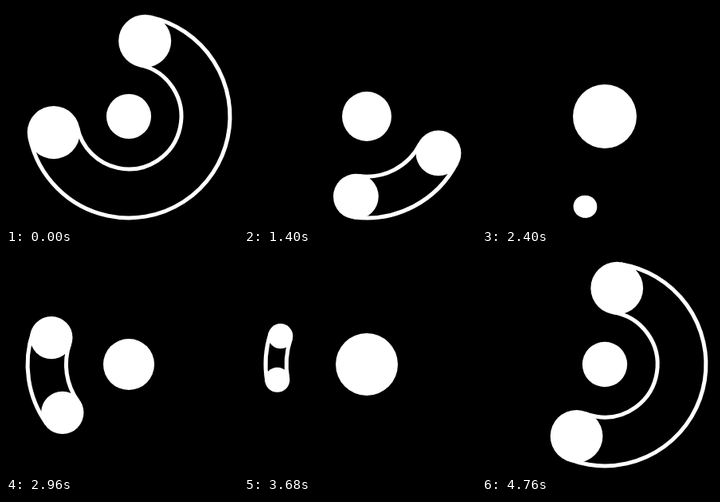
Recreate the animation shown at these times as an HTML page with a canvas. Size 291 by 275 pixels, loop 4.8 s.

```html
<!DOCTYPE html>
<html lang="en">
<head>
<meta charset="utf-8">
<title>Orbiting arc</title>
<style>
  html, body { margin: 0; width: 100%; height: 100%; overflow: hidden; background: #000; }
  canvas { display: block; width: 291px; height: 275px; }
</style>
</head>
<body>
<canvas id="stage"></canvas>
<script>
const W = 291, H = 275, CX = 154, CY = 138;
const LOOP = 4800, CYCLE = 1600;
const OUTER = 129.4, LINE = 5;

const canvas = document.getElementById('stage');
const ctx = canvas.getContext('2d');
const dpr = window.devicePixelRatio || 1;
canvas.width = Math.round(W * dpr);
canvas.height = Math.round(H * dpr);
ctx.scale(dpr, dpr);

const clamp = x => Math.min(1, Math.max(0, x));
const mix = (a, b, k) => a + (b - a) * k;
const smooth = x => x * x * (3 - 2 * x);
const rad = deg => deg * Math.PI / 180;

// Cubic Bezier easing with control heights 0 and 1
function bezier(x, x1, x2) {
  if (x <= 0 || x >= 1) return clamp(x);
  let lo = 0, hi = 1;
  for (let i = 0; i < 30; i++) {
    const s = (lo + hi) / 2, q = 1 - s;
    if (3 * q * q * s * x1 + 3 * q * s * s * x2 + s * s * s < x) lo = s;
    else hi = s;
  }
  return smooth(lo);
}

// Leading end, in degrees: runs ahead exponentially, then settles on a full turn
function headAngle(p) {
  if (p < 480) return 360 - 114.6 * (1 - p / 480) ** 2;
  return 360 + Math.max(0, 246.5 * Math.exp(-0.0062 * (CYCLE - p)) - 1.1);
}

const tailAngle = p => 360 * bezier(p / 840, 0.25, -0.046);

// 0 = small end balls and large centre, 1 = the reverse
function swell(p) {
  if (p < 900) return Math.max(0, 1.02 * Math.exp(-0.0047 * p) - 0.02);
  return smooth(clamp((p - 985) / (CYCLE - 985)));
}

function disc(x, y, r) {
  ctx.beginPath();
  ctx.arc(x, y, r, 0, 2 * Math.PI);
  ctx.fill();
}

function band(r, from, to, width, color) {
  ctx.beginPath();
  ctx.arc(CX, CY, r, from, to);
  ctx.lineWidth = width;
  ctx.strokeStyle = color;
  ctx.stroke();
}

function draw(t) {
  const p = t % CYCLE, k = swell(p);
  const ball = mix(13.9, 33.1, k), orbit = OUTER - ball;
  const base = -78 + 360 * t / LOOP;
  const tail = rad(base + tailAngle(p)), head = rad(base + headAngle(p));

  ctx.fillStyle = '#000';
  ctx.fillRect(0, 0, W, H);
  band(orbit, tail, head, 2 * ball, '#fff');
  band(orbit, tail, head, 2 * (ball - LINE), '#000');

  ctx.fillStyle = '#fff';
  for (const a of [tail, head]) {
    disc(CX + orbit * Math.cos(a), CY + orbit * Math.sin(a), ball);
  }
  disc(CX, CY, mix(40, 28, k));
}

const start = performance.now();
function tick() {
  draw((performance.now() - start) % LOOP);
  requestAnimationFrame(tick);
}
tick();
</script>
</body>
</html>
```
